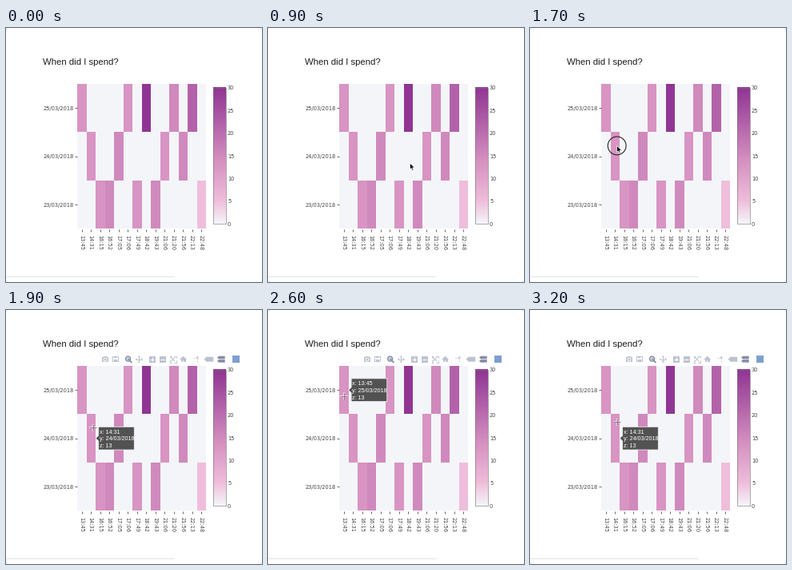
Recreate the animation shown at these times as a matplotlib script. Size 320x318 px, loop 3.3 s.

```python
import numpy as np
import matplotlib.pyplot as plt
from matplotlib.animation import FuncAnimation
from matplotlib.colors import LinearSegmentedColormap
from matplotlib.patches import Circle, FancyBboxPatch, Polygon, Rectangle

W, H, DPI = 320, 318, 100
FRAMES, STEP = 33, 100
PX = 72 / DPI

LEFT, TOP, RIGHT, BOTTOM = 89, 70, 250, 251.3
TIMES = ("13:45 14:31 16:15 16:52 17:05 17:06 17:49 "
         "18:42 19:43 21:06 21:20 21:56 22:13 22:48").split()
DATES = [f"{day}/03/2018" for day in (25, 24, 23)]
DAY_OF = [int(d) for d in "01221020210102"]
BIG = {7: 30, 12: 22, 13: 5}
DARKER = {3, 4, 8, 10, 11}
SPENT = [BIG.get(c, 15 if c in DARKER else 13) for c in range(len(TIMES))]
CW = (RIGHT - LEFT) / len(TIMES)
RH = (BOTTOM - TOP) / len(DATES)

SCALE = LinearSegmentedColormap.from_list("spend", [
    (0, "#f4f5f9"), (5 / 30, "#efbddb"), (14 / 30, "#d58fc0"), (1, "#903593")])
INK, ICON, ICON_ON = "#444444", "#bdc2d0", "#858da5"

fig = plt.figure(figsize=(W / DPI, H / DPI), dpi=DPI, facecolor="white")
ax = fig.add_axes([0, 0, 1, 1])


# drawing helpers, all in stage pixels
def text(x, y, s, size=6.7, color=INK, font="DejaVu Sans", **kw):
    return ax.text(x, y, s, fontsize=size * PX, color=color, family=font,
                   va="baseline", **kw)


def line(xs, ys, color=INK, width=0.8, **kw):
    return ax.plot(xs, ys, color=color, lw=width * PX,
                   solid_capstyle="butt", **kw)[0]


def box(x, y, w, h, color):
    return ax.add_patch(Rectangle((x, y), w, h, fc=color, lw=0))


def square(x, y, r, color):
    return box(x - r, y - r, 2 * r, 2 * r, color)


def shape(points, color, edge="none", width=0, **kw):
    return ax.add_patch(Polygon(points, closed=True, fc=color, ec=edge,
                                lw=width * PX, **kw))


def plus(x, y, r, color, width):
    line([x - r, x + r], [y, y], color, width)
    line([x, x], [y - r, y + r], color, width)


def center(col, row):
    return LEFT + (col + 0.5) * CW, TOP + (row + 0.5) * RH


def page():
    ax.add_patch(Rectangle((0, 0), W, H, fc="#f0f0f0", lw=0, zorder=0))
    ax.add_patch(FancyBboxPatch((4, 4), W - 8, H - 8, fc="white", lw=0, zorder=0,
                                boxstyle="round,pad=4,rounding_size=4"))
    line([0, 210], [310.5, 310.5], "#e2e2e2", 1)
    text(46, 45.6, "When did I spend?", 11.35, "#1c1c1c", "Liberation Sans")


def heatmap():
    box(LEFT, TOP, RIGHT - LEFT, BOTTOM - TOP, "#f4f5f9")
    for c, (label, row, value) in enumerate(zip(TIMES, DAY_OF, SPENT)):
        x, y = center(c, row)
        box(x - CW / 2, y - RH / 2, CW, RH, SCALE(value / 30))
        line([x, x], [BOTTOM + 0.3, BOTTOM + 3.3])
        text(x - 2.9, 259, label, rotation=-90, rotation_mode="anchor")
    for r, label in enumerate(DATES):
        y = center(0, r)[1]
        line([LEFT - 3.2, LEFT], [y, y])
        text(84.7, y + 2.5, label, ha="right")


def colorbar(x=259, top=75, bottom=245.3):
    ax.imshow(np.linspace(1, 0, 170)[:, None], cmap=SCALE, aspect="auto",
              extent=(x, x + 16, bottom, top), zorder=1)
    ax.add_patch(Rectangle((x, top), 16, bottom - top, fill=False,
                           ec="#777777", lw=0.6 * PX, zorder=2))
    for v in range(0, 31, 5):
        text(x + 18, np.interp(v, [0, 30], [bottom, top]) + 2.4, str(v))


# toolbar icons
def camera(x, y):
    box(x - 4.2, y - 2.8, 8.4, 6.4, ICON)
    box(x - 2, y - 4, 4, 2, ICON)
    ax.add_patch(Circle((x, y + 0.4), 2, fc=ICON, ec="white", lw=PX))


def disk(x, y):
    square(x, y, 3.7, ICON)
    square(x, y, 2.8, "white")
    box(x - 2, y + 0.5, 4, 3, ICON)
    box(x - 2, y - 3.5, 3, 2, ICON)


def lens(x, y):
    ax.add_patch(Circle((x - 0.7, y - 0.6), 3, fc="#d9dce6", ec=ICON_ON, lw=1.4 * PX))
    line([x + 1.4, x + 4.1], [y + 1.6, y + 4.3], ICON_ON, 1.8)
    plus(x - 0.7, y - 0.6, 1.5, ICON_ON, 0.9)


def arrows(x, y):
    plus(x, y, 3.5, ICON, 1)
    for a in np.arange(4) * np.pi / 2:
        turn = a + np.array([0, 0.6, -0.6])
        reach = np.array([4.6, 3.1, 3.1])
        shape(np.c_[x + reach * np.cos(turn), y + reach * np.sin(turn)], ICON)


def zoom_out(x, y):
    square(x, y, 4, ICON)
    line([x - 2.4, x + 2.4], [y, y], "white", 1.2)


def zoom_in(x, y):
    zoom_out(x, y)
    line([x, x], [y - 2.4, y + 2.4], "white", 1.2)


def corners(x, y):
    for sx in (-1, 1):
        for sy in (-1, 1):
            line([x + sx * 1.6, x + sx * 3.9, x + sx * 3.9],
                 [y + sy * 3.9, y + sy * 3.9, y + sy * 1.6], ICON, 1)
            line([x, x + sx * 2.6], [y, y + sy * 2.6], ICON, 1)


def home(x, y):
    shape([(x - 4.5, y + 0.3), (x, y - 4), (x + 4.5, y + 0.3)], ICON)
    box(x - 3.1, y, 6.2, 3.7, ICON)
    box(x - 0.8, y + 1.2, 1.6, 2.5, "white")


def spikes(x, y):
    dots = (0, (1.5, 1.2))
    line([x - 4, x], [y - 2.2, y - 2.2], ICON, 0.9, ls=dots)
    line([x + 1.5, x + 1.5], [y - 1, y + 4], ICON, 0.9, ls=dots)
    ax.add_patch(Circle((x + 1.5, y - 2.2), 1.3, fc=ICON, lw=0))


def tag(x, y, w=5.8, h=3, color=ICON):
    shape([(x - w, y), (x - w + h, y - h), (x + w, y - h),
           (x + w, y + h), (x - w + h, y + h)], color)


def two_tags(x, y):
    for dy in (-2.2, 2.2):
        tag(x, y + dy, 4.8, 1.8, ICON_ON)


def badge(x, y):
    square(x, y, 4.5, "#7f9fd0")


def toolbar(x=124, y=61.7):
    start = set(ax.get_children())
    groups = [(13, [camera, disk]), (13, [lens, arrows]),
              (13, [zoom_in, zoom_out, corners, home]),
              (15.5, [spikes, tag, two_tags]), (13, [badge])]
    for gap, icons in groups:
        for icon in icons:
            icon(x, y)
            x += gap
        x += 3.3
    return [p for p in ax.get_children() if p not in start]


def tooltip(col):
    row = DAY_OF[col]
    x, y = center(col, row)
    x += CW / 2
    l, r, t, b = x + 3.6, x + 48.3, y - 14.4, y + 14.4
    parts = [shape([(x, y), (l, y - 3.5), (l, t), (r, t), (r, b), (l, b),
                    (l, y + 3.5)], "#525252", "#f4f4f6", 0.8, zorder=5)]
    rows = (f"x: {TIMES[col]}", f"y: {DATES[row]}", f"z: {SPENT[col]}")
    for i, s in enumerate(rows):
        parts.append(text(x + 4.9, y - 6 + 8.7 * i, s, 7.1, "white",
                          "Liberation Sans", zorder=6))
    return parts


# motion
def ease_out(t):
    return 1 - (1 - t) ** 1.3


def smooth(t):
    return t * t * (3 - 2 * t)


def glide(n, begin, end, a, b, bend=None, ease=smooth):
    """Point on a curve from a to b, pulled towards bend."""
    a, b = np.array(a), np.array(b)
    mid = (a + b) / 2 if bend is None else np.array(bend)
    u = ease(np.clip((n - begin) / (end - begin), 0, 1))
    return (1 - u) ** 2 * a + 2 * u * (1 - u) * mid + u * u * b


REST, CLICK = (162, 143), (108.7, 147.4)
FIRST_CELL, LAST, BEND = (95, 107.5), (109.3, 140.3), (109.5, 127)


def arrow_at(n):
    if n < 12:
        return glide(n, 8, 11, (188, 187), REST, ease=ease_out)
    return glide(n, 13, 16, REST, CLICK)


def cross_at(n):
    if n < 27:
        return glide(n, 19, 25, CLICK, FIRST_CELL, BEND)
    return glide(n, 29, 32, FIRST_CELL, LAST, BEND)


def show(parts, on):
    for p in parts:
        p.set_visible(on)


page()
heatmap()
colorbar()
bar = toolbar()
tip_left, tip_right = tooltip(0), tooltip(1)

ARROW = np.array([(0, 0), (0, 8.2), (1.9, 6.5), (3.2, 9.6), (4.6, 9),
                  (3.3, 6), (5.9, 5.8)])
arrow = shape(ARROW, "black", "white", 0.7, zorder=9)
ring = ax.add_patch(Circle(CLICK, 11.4, fill=False, ec="#222222",
                           lw=1.1 * PX, zorder=8))
halo = [line([], [], "white", 2.3, alpha=0.5, zorder=9) for _ in range(2)]
hair = [line([], [], "#7d787d", 0.9, zorder=9) for _ in range(2)]


def draw(n):
    hover = n >= 19
    on_left = 25 <= n < 31
    show(bar, hover)
    show(tip_left, on_left)
    show(tip_right, hover and not on_left)

    arrow.set_visible(8 <= n < 19)
    arrow.set_xy(ARROW + arrow_at(n))
    ring.set_visible(17 <= n < 19)
    ring.set_alpha(1 - 0.5 * (n - 17) if 17 <= n < 19 else 0)

    x, y = cross_at(n)
    for (flat, tall), r in ((halo, 4.7), (hair, 4)):
        flat.set_data([x - r, x + r], [y, y])
        tall.set_data([x, x], [y - r, y + r])
    show(halo + hair, hover)
    return []


ax.set_xlim(0, W)
ax.set_ylim(H, 0)
ax.axis("off")

anim = FuncAnimation(fig, draw, frames=FRAMES, interval=STEP, repeat=True,
                     init_func=lambda: draw(0), blit=False)
plt.show()
```
